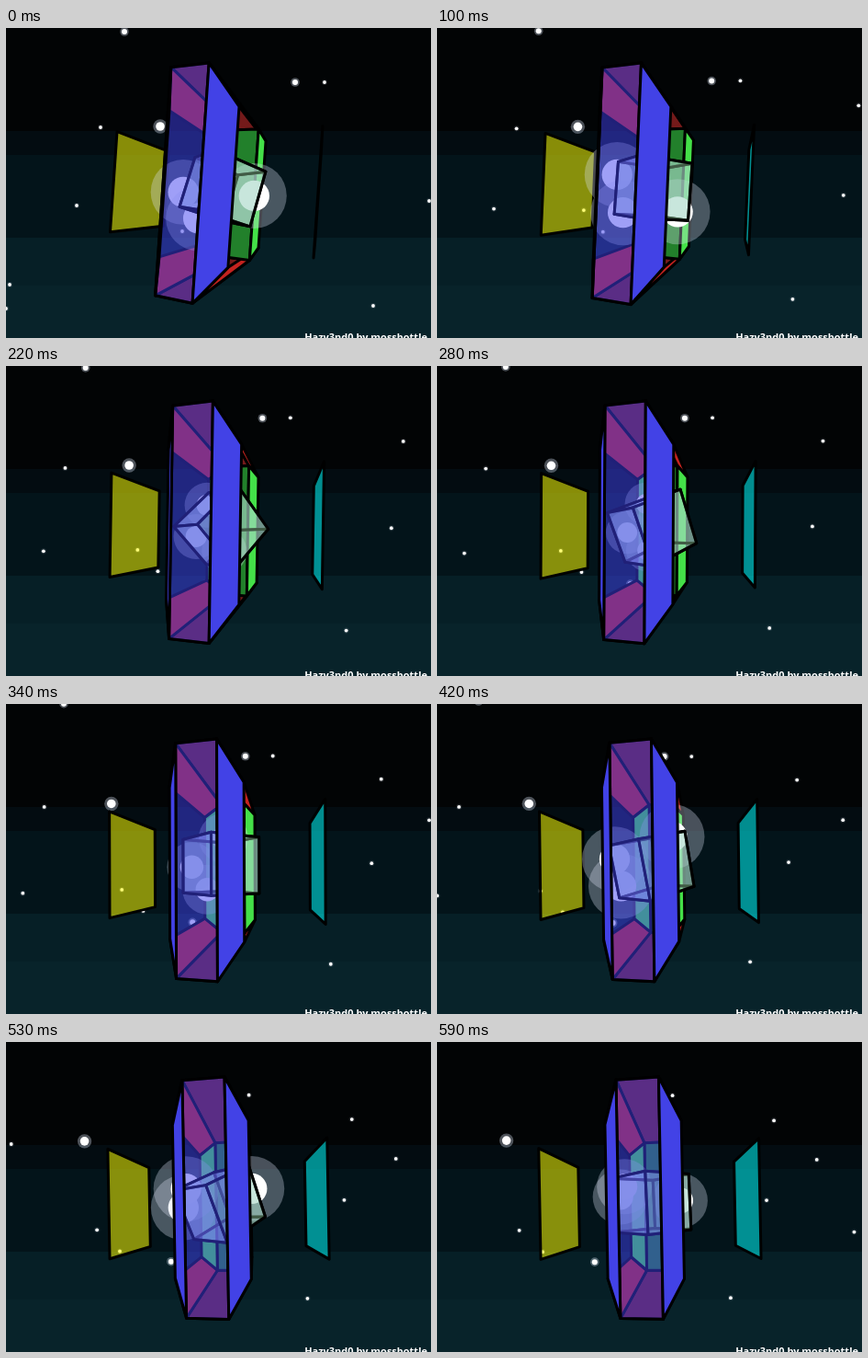
Write an HTML page that moves like this. It is 463 px wide and 337 px high and loops after 620 ms.

```html
<!DOCTYPE html>
<html lang="en">
<head>
<meta charset="utf-8">
<title>Crystal in space</title>
<style>
html, body { margin: 0; width: 100%; height: 100%; overflow: hidden; background: #020405; }
svg { display: block; width: 463px; height: 337px; }
text { font: 700 11px "Open Sans", "Noto Sans", sans-serif; fill: #fff; }
#scene { stroke-linejoin: round; stroke-linecap: round; }
</style>
</head>
<body>
<svg viewBox="0 0 463 337">
  <rect width="463" height="337" fill="#020405"/>
  <rect y="112" width="463" height="225" fill="#030c11"/>
  <rect y="138" width="463" height="199" fill="#03141a"/>
  <rect y="228" width="463" height="109" fill="#061f26"/>
  <rect y="280" width="463" height="57" fill="#08232a"/>
  <g id="scene"></g>
  <text x="459" y="340" text-anchor="end">Hazy3nd0 by mossbottle</text>
</svg>
<script>
const LOOP = 620, STEP = 30, LAST = 19;
const { sin, cos, tan, atan, PI } = Math;
const scene = document.getElementById('scene');

// Camera: centre of view, focal length, distance to the crystal.
const CX = 231.5, CY = 189, FOCAL = 300, DISTANCE = 433;
const TURN = 0.0131;
const yawAt = s => 0.348 - TURN * s;
const rollAt = s => 0.088 * (1 - s / LAST) ** 2 - 0.019;

const rotate = (x, y, a) => [x * cos(a) - y * sin(a), x * sin(a) + y * cos(a)];

function project([x, y, z], s) {
  const yaw = yawAt(s);
  const depth = DISTANCE + z * cos(yaw) - x * sin(yaw);
  const scale = FOCAL / depth;
  const [px, py] = rotate((2.5 + x * cos(yaw) + z * sin(yaw)) * scale, (y - 19) * scale, rollAt(s));
  return [CX + px, CY + py, depth];
}

// Far stars turn with the camera only, from where they first stand.
function projectStar(x0, y0, s) {
  const [x, y] = rotate(x0 - CX, y0 - CY, -rollAt(0));
  const a = atan(x / FOCAL), b = a - TURN * s;
  const [px, py] = rotate(FOCAL * tan(b), y * cos(a) / cos(b), rollAt(s));
  return [CX + px, CY + py];
}

// x, y and, for the larger ones, radius.
const stars = [
  [129, 4, 3], [315, 59, 3], [347, 59], [461, 188], [400, 302], [103, 108], [77, 193],
  [4, 279], [0, 305], [481, 88], [543, 140], [597, 242], [172, 197], [192, 221],
  [243, 238, 3], [168, 107, 4.8]
];

const glow = ([x, y], core, halo, alpha) =>
  `<circle cx="${x}" cy="${y}" r="${halo}" fill="#dbe4f5" fill-opacity="${alpha}"/>
   <circle cx="${x}" cy="${y}" r="${core}" fill="#fff"/>`;

const shape = (points, s, fill, alpha = 1) =>
  `<polygon points="${points.map(p => project(p, s).slice(0, 2)).join(' ')}"
    fill="${fill}" fill-opacity="${alpha}" stroke="#000" stroke-width="3"/>`;

// Crystal corners; side is -1 or 1 for left/right, top/bottom, near/far.
const ridge = (x, y, z) => [23.5 * x, 131 * y, 133 * z];
const flank = (x, y, z) => [48 * x, 97 * y, 90 * z];
const SIDES = [-1, 1];

const window_ = z => [ridge(-1, -1, z), ridge(1, -1, z), ridge(1, 1, z), ridge(-1, 1, z)];
const strip = (x, z) => [ridge(x, -1, z), flank(x, -1, z), flank(x, 1, z), ridge(x, 1, z)];
const cap = y => [ridge(-1, y, -1), ridge(1, y, -1), ridge(1, y, 1), ridge(-1, y, 1)];
const slope = (x, y) => [ridge(x, y, -1), flank(x, y, -1), flank(x, y, 1), ridge(x, y, 1)];
const panel = x => [[-1, -1], [-1, 1], [1, 1], [1, -1]].map(([y, z]) => [144 * x, 75 * y, 75 * z]);

const crystalBack = s =>
  SIDES.map(y => shape(cap(y), s, '#741a1a') +
    SIDES.map(x => shape(slope(x, y), s, '#c4231f')).join('')).join('') +
  shape(window_(1), s, '#22802b') +
  SIDES.map(x => shape(strip(x, 1), s, '#44e048')).join('');

const crystalFront = s =>
  shape(window_(-1), s, '#4040f0', 0.5) +
  SIDES.map(x => shape(strip(x, -1), s, '#4242e6')).join('');

// A glassy box that spins quickly about a diagonal axis.
function box(s) {
  const spin = (14 - 34 * s) * PI / 180;
  const place = p => {
    const [x, y] = rotate(p[0] * 43, p[1] * 43, spin);
    const [px, pz] = rotate(x, p[2] * 43, PI / 4);
    return [px, y, pz];
  };
  const faces = [];
  for (let axis = 0; axis < 3; axis++) {
    for (const side of SIDES) {
      const points = [[-1, -1], [1, -1], [1, 1], [-1, 1]].map(([u, v]) => {
        const p = [];
        p[axis] = side;
        p[(axis + 1) % 3] = u;
        p[(axis + 2) % 3] = v;
        return place(p);
      });
      const depth = points.reduce((sum, p) => sum + project(p, s)[2], 0);
      faces.push({ points, depth, fill: axis === 2 ? '#a4e6b0' : '#b4c0f0' });
    }
  }
  return faces.sort((a, b) => b.depth - a.depth)
    .map(f => shape(f.points, s, f.fill, 0.4)).join('');
}

// Orbs circle the box and swell in a slow pulse; angles in degrees.
function orbs(s) {
  const halo = 30 + 7 * cos((s - 1.5) * PI / 7);
  return [[11, 9.5], [175, 9.5], [125, 4.6]].map(([start, speed]) => {
    const a = (start + speed * s) * PI / 180;
    return glow([232 + 1.1 * halo * cos(a), 175 + 1.1 * halo * sin(a)], halo * 0.47, halo, 0.32);
  }).join('');
}

function draw(s) {
  scene.innerHTML =
    stars.map(([x, y, r = 1.9]) =>
      glow(projectStar(x, y, s), r, r * 1.6, r > 2 ? 0.35 : 0.12)).join('') +
    shape(panel(-1), s, '#ff0', 0.53) + shape(panel(1), s, '#0ff', 0.53) +
    crystalBack(s) + orbs(s) + box(s) + crystalFront(s);
}

let shown = -1;
function tick() {
  const step = Math.min(LAST, Math.floor(performance.now() % LOOP / STEP));
  if (step !== shown) draw(shown = step);
  requestAnimationFrame(tick);
}
tick();
</script>
</body>
</html>
```
